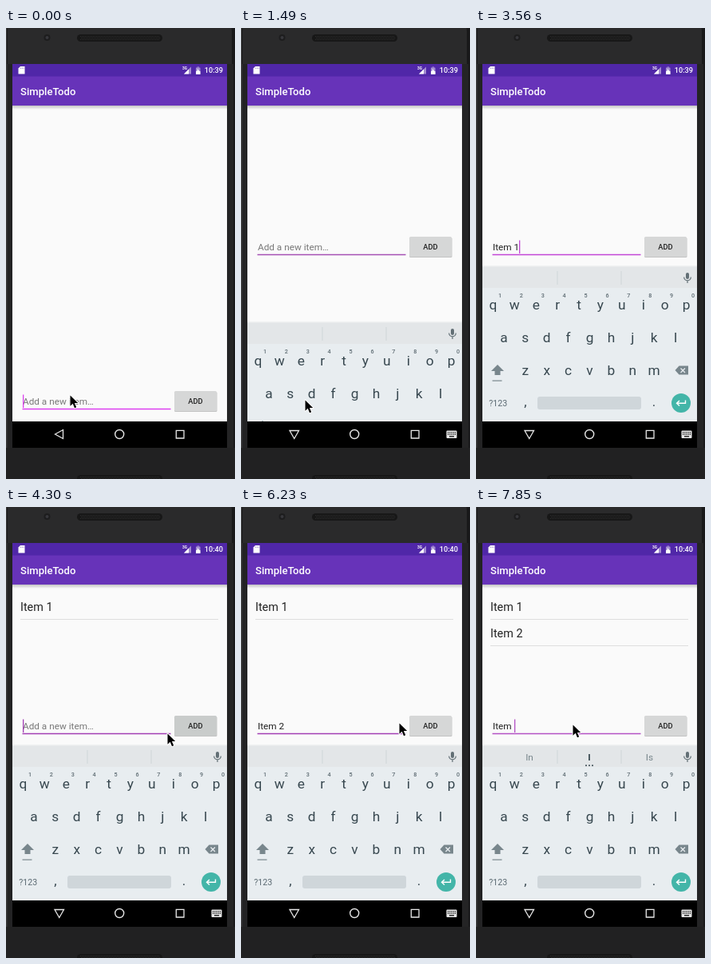
These frames come from a looping animation (287x564 px, 8000 ms). An HTML page with a canvas:

```html
<!DOCTYPE html>
<html>
<head>
<meta charset="utf-8">
<style>
  html, body { margin: 0; width: 100%; height: 100%; overflow: hidden; background: #222; }
  canvas { display: block; width: 287px; height: 564px; }
</style>
</head>
<body>
<canvas id="stage"></canvas>
<script>
const W = 287, H = 564, LOOP = 8000;
const canvas = document.getElementById('stage');
const dpr = window.devicePixelRatio || 1;
canvas.width = W * dpr;
canvas.height = H * dpr;
const ctx = canvas.getContext('2d');

// Step tracks: [start time, value]
const cursorTrack = [
  [0, [80, 459]], [600, [80, 462]], [750, [80, 465]],
  [1790, [84, 430]], [1940, [91, 381]], [2090, [95, 351]], [2980, null],
  [3700, [277, 318]], [3850, [232, 277]], [4150, [222, 280]], [4300, [202, 283]], [4890, null],
  [6230, [198, 270]], [6380, [220, 272]], [6530, [231, 273]],
  [6970, [205, 275]], [7120, [158, 274]], [7260, [121, 272]]
];
const textTrack = [
  [0, ''], [2240, 'I'], [2390, 'It'], [2540, 'Item'], [2680, 'Item '], [3130, 'Item 1'], [4000, ''],
  [4890, 'I'], [5040, 'Item'], [5340, 'Item '], [5640, 'Item 2'], [6670, ''],
  [7560, 'I'], [7710, 'Ite'], [7850, 'Item ']
];
const caretTrack = [
  [0, 1], [150, 0], [600, 1], [1190, 0], [2240, 1], [4590, 0], [4890, 1],
  [6230, 0], [6670, 1], [7120, 0], [7560, 1]
];
const suggestTrack = [[0, 0], [2390, 1], [2980, 0], [5040, 1], [5490, 0], [7710, 1]];
const buttonTrack = [[0, '#d6d7d7'], [4000, '#cfd1d0'], [4150, '#c9cccb'], [4440, '#d0d2d1'], [4590, '#d6d7d7']];
const accentTrack = [[0, '#dc3ff0'], [1190, '#a550b4'], [2980, '#c246d6'], [4000, '#a23eb4'], [7560, '#b351c4']];
const keyboardTrack = [[0, 194], [1490, 70], [1640, 0]];

const at = (track, t) => track.filter(([start]) => start <= t).pop()[1];

function rect(x, y, w, h, color, radius = 0) {
  ctx.fillStyle = color;
  ctx.beginPath();
  ctx.roundRect(x, y, w, h, radius);
  ctx.fill();
}
function circle(x, y, r, color) {
  ctx.fillStyle = color;
  ctx.beginPath();
  ctx.arc(x, y, r, 0, 7);
  ctx.fill();
}
function fill(d, color) {
  ctx.fillStyle = color;
  ctx.fill(new Path2D(d));
}
function stroke(d, color, width = 1.3) {
  ctx.strokeStyle = color;
  ctx.lineWidth = width;
  ctx.stroke(new Path2D(d));
}
function text(str, x, y, size, color, weight = 400, align = 'left') {
  ctx.font = `${weight} ${size}px Roboto, sans-serif`;
  ctx.textAlign = align;
  ctx.fillStyle = color;
  ctx.fillText(str, x, y);
}
function gradient(y0, y1, from, to) {
  const g = ctx.createLinearGradient(0, y0, 0, y1);
  g.addColorStop(0, from);
  g.addColorStop(1, to);
  return g;
}

function speaker(y) {
  rect(89, y, 107, 9, '#171717', 4.5);
  for (let row = 0; row < 3; row++)
    for (let x = 93 + row % 2; x < 193; x += 2) rect(x, y + 2 + row * 2, 1, 1, '#303030');
}

function drawPhone() {
  rect(0, 0, W, H, '#3c3c3d');
  rect(1, -20, 284, 604, '#19191a', 24);
  rect(2, -20, 281, 602, '#2a2a2b', 24);
  rect(0, 45, 8, 480, '#232324');
  rect(0, 45, 1.5, 480, '#39393a');
  rect(277, 45, 8, 480, '#242425');
  rect(285, 0, 2, H, '#18181a');
  rect(0, 525, W, 39, '#212122');
  speaker(8);
  speaker(559);
  circle(51.5, 12, 4, '#1d1d1e');
  circle(51.5, 12, 2, '#38383c');
}

function drawBars(t) {
  rect(8, 97, 269, 5, gradient(97, 102, '#c3c3c3', '#fafafa'));
  rect(8, 45, 269, 16, '#5027a8');
  rect(8, 60.5, 269, 36.5, '#6733b9');
  text('SimpleTodo', 18, 84, 13.1, '#fff', 500);
  fill('M18 48H23.5V57.5H15.5V50.5Z', '#fff');
  stroke('M18.5 49.5V51M20.3 49.5V51M22 49.5V51', '#8c70c5', .7);
  text('3G', 221, 52, 4.8, '#fff', 700);
  fill('M232 48.5V57.5H223Z', '#a48dd2');
  fill('M229 51.5V57.5H223Z', '#fff');
  rect(238, 49.5, 5.5, 8.5, '#a48dd2', .6);
  rect(239.5, 48.5, 2.5, 1.2, '#a48dd2');
  rect(238, 54, 5.5, 4, '#fff', .6);
  fill('M241 50.5L239.3 54H240.6V56.5L242.3 53H241Z', '#fff');
  text(t < 4000 ? '10:39' : '10:40', 272, 56.2, 9.16, '#fff', 500, 'right');
}

function drawField(t) {
  const typed = at(textTrack, t), accent = at(accentTrack, t);
  ctx.save();
  if (t >= 1190) ctx.translate(0, -193);
  if (typed) text(typed, 21, 471, 11.78, '#212121');
  else text('Add a new item…', 21, 471, 11.78, '#777');
  ctx.font = '400 11.78px Roboto, sans-serif';
  if (at(caretTrack, t)) rect(21 + Math.round(ctx.measureText(typed).width), 458.5, 1.3, 16.5, accent);
  rect(20.5, 475.8, 186, 1.4, accent);
  rect(211, 455, 53.5, 25, '#c3c4c4', 1.5);
  rect(211, 454, 53, 25, at(buttonTrack, t), 1.5);
  text('ADD', 237.5, 469.8, 9.3, '#212121', 500, 'center');
  ctx.restore();
}

function drawList(t) {
  [4000, 6670].forEach((added, i) => {
    if (t < added) return;
    text('Item ' + (i + 1), 18, 130 + 33 * i, 14.4, '#212121');
    rect(18, 140 + 33 * i, 248, 1, '#dedede');
  });
}

function drawKeyboard(t) {
  const ink = '#37474f', soft = '#78868c', step = 26.9;
  rect(8, 298, 269, 194, '#e8edf0');
  rect(8, 298, 269, 27, '#e3e6e8');
  rect(8, 297, 269, 1.5, '#eff1f2');
  rect(101.5, 304, 1, 17, '#d0d5d8');
  rect(181.5, 304, 1, 17, '#d0d5d8');
  rect(263, 306, 4, 8, '#626f75', 2);
  stroke('M260.7 311.5A4.2 4.2 0 0 0 269.3 311.5M265 315.5V319', '#626f75', 1.2);
  if (at(suggestTrack, t)) {
    text('In', 67, 317, 11.8, soft, 400, 'center');
    text('I', 142, 317, 11.8, ink, 700, 'center');
    text('Is', 217.5, 317, 11.8, soft, 400, 'center');
    for (let i = -1; i < 2; i++) circle(142 + 4 * i, 323.3, 1, ink);
  }
  ['qwertyuiop', 'asdfghjkl', 'zxcvbnm'].forEach((row, r) => {
    [...row].forEach((key, i) => {
      const x = [21.45, 34.9, 61.8][r] + i * step;
      text(key, x, 352 + 41 * r, 17.3, ink, 400, 'center');
      if (!r) text((i + 1) % 10, x + 8.5, 337, 7.2, '#5d6b72', 500, 'center');
    });
  });
  fill('M27 421L35 429H30.5V434H23.5V429H19Z', soft);
  rect(20.5, 440.5, 12, 1.2, soft);
  fill('M254.5 422.5H266V433.5H254.5L249.5 428Z', soft);
  stroke('M256.5 425.5L262 431M262 425.5L256.5 431', '#e8edf0', 1.3);
  text('?123', 27.7, 472.5, 10.6, '#5b6a72', 400, 'center');
  text(',', 61.8, 473, 17, ink, 400, 'center');
  rect(77, 461, 130, 16, '#cfd6da', 3);
  text('.', 223, 473, 17, ink, 400, 'center');
  circle(257, 469, 12, '#43b5a8');
  stroke('M262.5 465.5V469.3H252M255 466L251.5 469.3L255 472.6', '#fff', 1.4);
}

function drawNav(t) {
  const open = t >= 1190, ink = '#e6e6e6';
  rect(8, 492, 269, 33, '#000');
  stroke(open ? 'M61 503.5H72.5L66.75 513.5Z' : 'M61.5 508L71.5 502.5V513.5Z', ink);
  stroke('M136.7 508A5.5 5.5 0 1 1 147.7 508A5.5 5.5 0 1 1 136.7 508', ink, 1.4);
  stroke('M213.3 503.3H223V513H213.3Z', ink);
  if (!open) return;
  rect(257.5, 503.5, 13, 9.5, ink, 1);
  for (let i = 0; i < 5; i++)
    for (let j = 0; j < 2; j++) rect(259 + i * 2.2, 505.3 + j * 2.3, 1.2, 1.2, '#000');
  rect(261, 510.2, 6, 1.2, '#000');
}

function drawCursor(pos) {
  if (!pos) return;
  ctx.save();
  ctx.translate(...pos);
  ctx.lineJoin = 'round';
  const arrow = 'M.5 .5V13.8L3.7 10.8L6 16.2L8.2 15.2L5.9 10H10.2Z';
  stroke(arrow, '#fff', 2);
  fill(arrow, '#000');
  ctx.restore();
}

function draw(t) {
  ctx.setTransform(dpr, 0, 0, dpr, 0, 0);
  drawPhone();
  rect(8, 45, 269, 480, '#fafafa');
  drawBars(t);
  drawList(t);
  drawField(t);
  if (t >= 1490) {
    ctx.save();
    ctx.translate(0, at(keyboardTrack, t));
    drawKeyboard(t);
    ctx.restore();
    rect(8, 525, 269, 39, '#212122');
    speaker(559);
  }
  drawNav(t);
  drawCursor(at(cursorTrack, t));
}

const start = performance.now();
function tick() {
  draw((performance.now() - start) % LOOP);
  requestAnimationFrame(tick);
}
tick();
</script>
</body>
</html>
```
